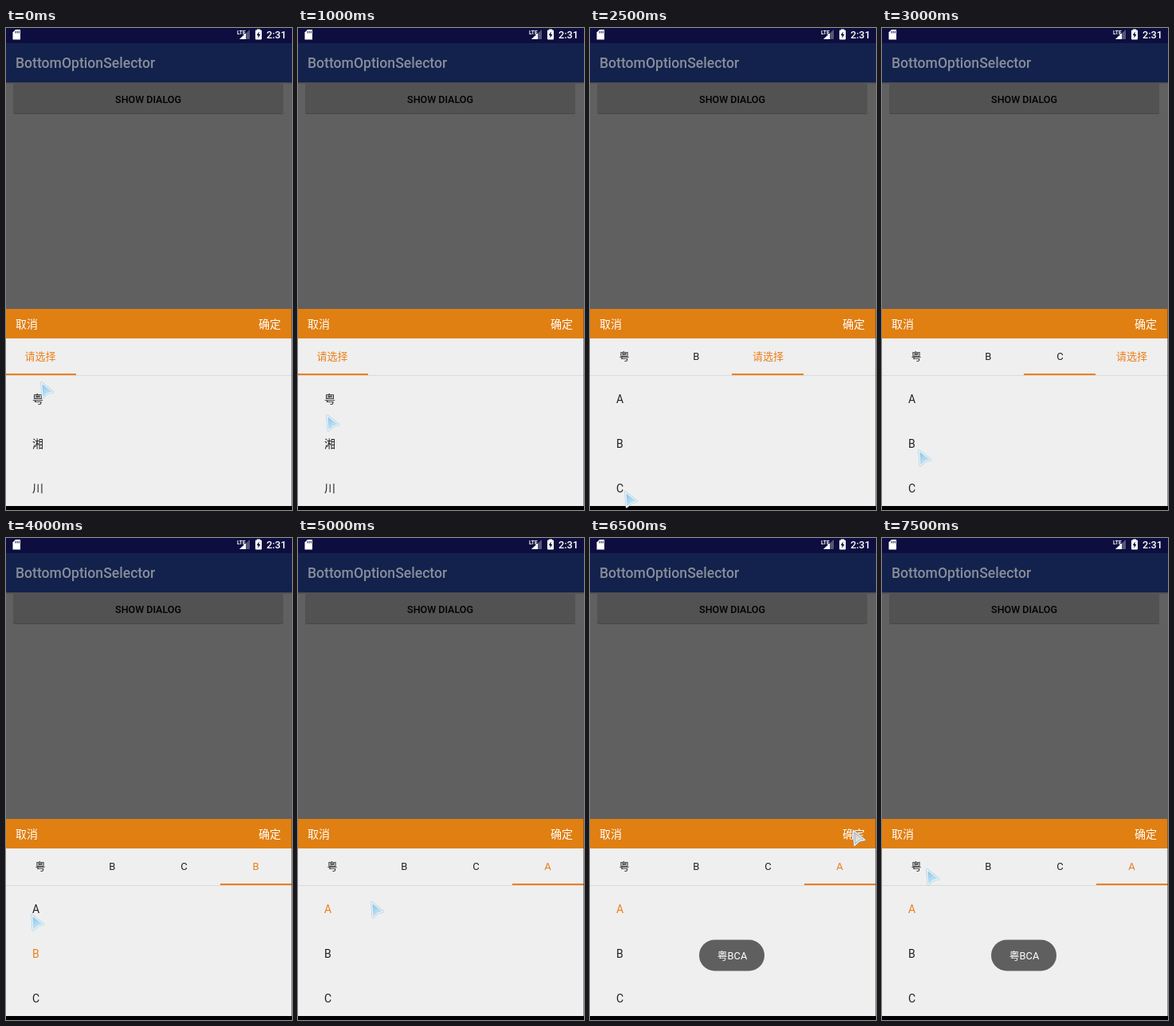
An HTML page with a canvas for the animation above (8 s loop, 359 px wide and 604 px high).

```html
<!DOCTYPE html>
<html lang="zh-CN">
<head>
<meta charset="utf-8">
<title>Bottom option selector</title>
<style>
html, body { margin: 0; width: 100%; height: 100%; overflow: hidden; background: #000; }
canvas { display: block; }
</style>
</head>
<body>
<canvas id="stage" width="359" height="604"></canvas>
<script>
const ctx = document.getElementById('stage').getContext('2d');
const STEP = 500, LOOP = 8000;
const ORANGE = '#e07f12', ACCENT = '#ec7f1c', INK = '#202020', PAPER = '#efefef';
const FONT = 'Roboto, "Noto Sans CJK SC", "Noto Sans CJK", sans-serif';
const PICK = '请选择';

// Pointer position for every step
const pointer = [
  [43, 443], [14, 464], [35, 484], [42, 540], [46, 529], [43, 580], [45, 528], [44, 516],
  [31, 471], [30, 471], [91, 455], [299, 379], [329, 365], [329, 365], [114, 422], [55, 414]
];

// Dialog states: first step, tab labels, underlined tab, selected row
const states = [
  { from: 0, tabs: [PICK], line: 0, row: -1 },
  { from: 3, tabs: ['粤', PICK], line: 1, row: -1 },
  { from: 5, tabs: ['粤', 'B', PICK], line: 2, row: -1 },
  { from: 6, tabs: ['粤', 'B', 'C', PICK], line: 2, row: -1 },
  { from: 7, tabs: ['粤', 'B', 'C', PICK], line: 3, row: -1 },
  { from: 8, tabs: ['粤', 'B', 'C', 'B'], line: 3, row: 1 },
  { from: 10, tabs: ['粤', 'B', 'C', 'A'], line: 3, row: 0 }
];
const TOAST_FROM = 13;

function rect(x, y, w, h, color) {
  ctx.fillStyle = color;
  ctx.fillRect(x, y, w, h);
}

function round(x, y, w, h, r, color) {
  ctx.fillStyle = color;
  ctx.beginPath();
  ctx.roundRect(x, y, w, h, r);
  ctx.fill();
}

function poly(points, color) {
  ctx.beginPath();
  points.forEach(([x, y]) => ctx.lineTo(x, y));
  ctx.closePath();
  ctx.fillStyle = color;
  ctx.fill();
}

function text(str, x, y, size, color, align = 'left', weight = 400) {
  ctx.font = `${weight} ${size}px ${FONT}`;
  ctx.textAlign = align;
  ctx.fillStyle = color;
  ctx.fillText(str, x, y);
}

function drawStatus() {
  rect(0, 0, 359, 19, '#0d0e3f');
  poly([[12, 2], [18, 2], [18, 14.5], [8.5, 14.5], [8.5, 5.5]], '#fff');
  [11.5, 13.7, 15.9].forEach(x => rect(x, 4, 1, 2.5, '#0d0e3f'));
  poly([[306, 2], [306, 14], [293, 14]], '#55577a');
  poly([[301, 6.6], [301, 14], [293, 14]], '#fff');
  text('LTE', 290, 7.5, 6.5, '#fff', 'left', 700);
  rect(315, 1.5, 4, 2, '#fff');
  round(313, 2.5, 8, 12, 1, '#fff');
  poly([[317.6, 4.5], [314.6, 9.2], [316.6, 9.2], [316.4, 12.8], [319.4, 8], [317.6, 8]], '#0d0e3f');
  text('2:31', 327, 13, 12.7, '#fff', 'left', 500);
}

function drawPage() {
  rect(0, 19, 359, 333, '#606060');
  rect(0, 19, 359, 49, '#13224c');
  text('BottomOptionSelector', 12, 50, 17.6, '#888d99', 'left', 500);
  rect(0, 68, 359, 1, '#484a50');
  rect(0, 69, 359, 1, '#545556');
  round(9, 71, 339, 37, 2, '#484848');
  round(9, 70, 339, 37, 2, '#525252');
  text('SHOW DIALOG', 178.5, 94, 12.5, '#000', 'center', 500);
}

function drawDialog({ tabs, line, row }) {
  rect(0, 352, 359, 37, ORANGE);
  text('取消', 12, 376, 14, '#fff');
  text('确定', 345, 376, 14, '#fff', 'right');
  rect(0, 389, 359, 210, PAPER);
  rect(0, 435, 359, 1, '#d9dbdd');
  const last = tabs.length - 1;
  tabs.forEach((label, i) =>
    text(label, 43 + i * 90.2, 416, 13, i === last ? ACCENT : INK, 'center'));
  const left = line ? Math.round(90.2 * line - 2) : 0;
  rect(left, 433, Math.round(90.2 * line + 88) - left, 2, ACCENT);
  const rows = last ? ['A', 'B', 'C'] : ['粤', '湘', '川'];
  rows.forEach((label, i) =>
    text(label, 33, 469.5 + i * 56.2, 14, i === row ? ACCENT : INK));
  rect(358, 352, 1, 247, 'rgba(70,70,70,.6)');
  rect(0, 599, 359, 5, '#000');
}

function drawToast() {
  round(137, 503.5, 82, 39, 19.5, '#5f5f5f');
  text('粤BCA', 178.5, 528, 12.8, '#fff', 'center');
}

function drawPointer([x, y]) {
  const onBar = y < 370;
  ctx.save();
  ctx.translate(x, y);
  const fill = ctx.createLinearGradient(2, 3, 13, 17);
  fill.addColorStop(0, onBar ? '#c4c8ce' : '#7fbfe9');
  fill.addColorStop(1, onBar ? '#f0f0f2' : '#d3edfa');
  ctx.lineJoin = 'round';
  poly([[1.5, 1.5], [16, 13.2], [9, 14.8], [3, 20.2]], fill);
  ctx.lineWidth = 2.6;
  ctx.strokeStyle = onBar ? '#8d9198' : '#a9cbe0';
  ctx.stroke();
  ctx.lineWidth = 1.4;
  ctx.strokeStyle = onBar ? '#f4f4f4' : '#e6f5fd';
  ctx.stroke();
  ctx.restore();
}

function draw(time) {
  const step = Math.floor((time % LOOP) / STEP);
  drawStatus();
  drawPage();
  drawDialog(states.filter(s => s.from <= step).pop());
  if (step >= TOAST_FROM) drawToast();
  drawPointer(pointer[step]);
}

let start;
function tick(now) {
  start ??= now;
  draw(Math.max(0, now - start));
  requestAnimationFrame(tick);
}
draw(0);
requestAnimationFrame(tick);
</script>
</body>
</html>
```
